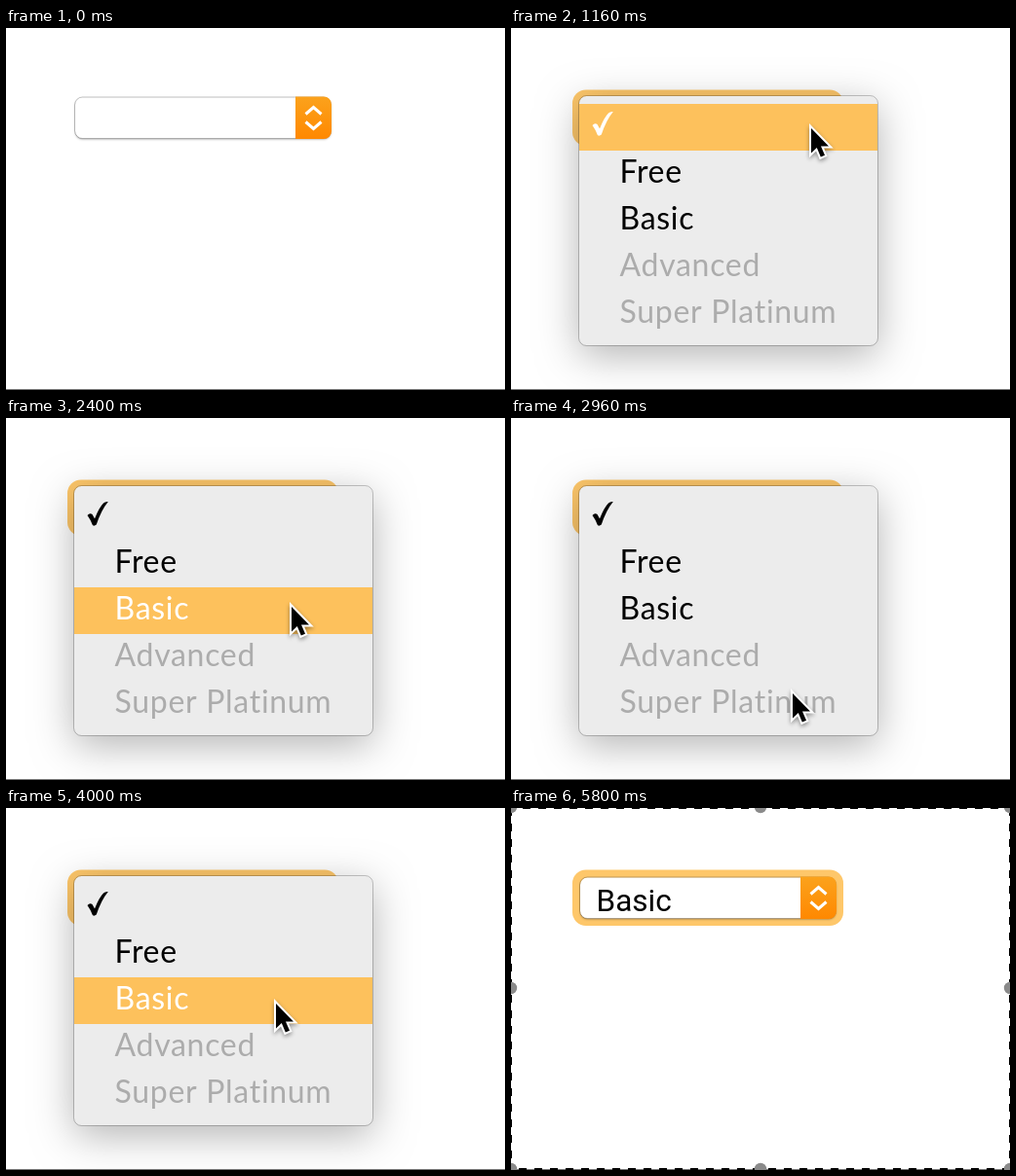
An HTML page with a canvas for the animation above (6600 ms loop, 512 by 372 pixels).

```html
<!DOCTYPE html>
<html lang="en">
<head>
<meta charset="utf-8">
<title>Select menu</title>
<style>
html, body { margin: 0; width: 100%; height: 100%; overflow: hidden; background: #fff; }
canvas { display: block; }
</style>
</head>
<body>
<canvas id="stage" width="512" height="372"></canvas>
<script>
const ctx = document.getElementById('stage').getContext('2d');
const W = 512, H = 372, LOOP = 6600, STEP = 40;
const OPEN = 520, BLINK = 3920, PICK = 4000, FADE = 4080, CLOSED = 4120;
const MARQUEE = 5320, LEAVE = 5800;
const ROW_TOP = 78, ROW_H = 48;
const LABELS = ['', 'Free', 'Basic', 'Advanced', 'Super Platinum'];

// The cursor rests between moves; each one eases out to its goal.
const MOVES = [
  { from: 0, to: 160, x: 315, y: 91 },
  { from: 480, to: 1160, x: 308, y: 103 },
  { from: 1480, to: 2080, x: 295, y: 167 },
  { from: 2160, to: 2400, x: 293, y: 194 },
  { from: 2560, to: 2960, x: 289, y: 283 },
  { from: 3240, to: 3680, x: 277, y: 201 },
  { from: 5680, to: 5800, x: 296, y: 350 }
];

const arrow = new Path2D('M0 0V25.5L5.8 20L9.8 29.5L14 27.7L10 18.4H18Z');
const check = new Path2D('M83.5 100Q86 97 88.5 99L91 103.5Q95.5 92 100 87.5Q102 85.5 104.8 86Q97.5 95 92.8 109.5Q90.5 111.5 88.8 110Q86.5 104 83.5 100');
const chevrons = new Path2D('M307.5 88.5L315.5 81.5L323.5 88.5M307.5 96.5L315.5 103.5L323.5 96.5');

const easeOut = p => 1 - (1 - p) * (1 - p);

function cursorAt(t) {
  if (t < STEP || t >= LEAVE) return null;
  let x = 580, y = 400;
  for (const m of MOVES) {
    if (t <= m.from) break;
    const p = easeOut(Math.min(1, (t - m.from) / (m.to - m.from)));
    x += (m.x - x) * p;
    y += (m.y - y) * p;
  }
  return { x, y };
}

function box(x, y, w, h, r, fill) {
  ctx.beginPath();
  ctx.roundRect(x, y, w, h, r);
  if (fill) {
    ctx.fillStyle = fill;
    ctx.fill();
  }
}

function outline(color, width, path) {
  ctx.strokeStyle = color;
  ctx.lineWidth = width;
  if (path) ctx.stroke(path);
  else ctx.stroke();
}

function shadow(color, blur, dy) {
  ctx.shadowColor = color;
  ctx.shadowBlur = blur;
  ctx.shadowOffsetY = dy;
}

function text(str, x, y, color, font, spacing) {
  ctx.font = font;
  ctx.letterSpacing = spacing;
  ctx.fillStyle = color;
  ctx.fillText(str, x, y);
}

function drawSelect(focused, value) {
  if (focused) box(63, 63.5, 278, 57.5, 14, '#fec76a');
  ctx.save();
  shadow('rgba(0,0,0,.35)', 2, 1);
  box(71, 71.5, 262.5, 42, 7.5, '#fff');
  ctx.restore();
  box(70.5, 71, 263, 42.5, 8);
  outline('rgba(0,0,0,.22)', 1);

  const glow = ctx.createLinearGradient(0, 71, 0, 114);
  glow.addColorStop(0, '#fba21c');
  glow.addColorStop(1, '#ff8800');
  box(297, 70.5, 37, 43.5, [0, 8, 8, 0], glow);
  outline('#fff', 3, chevrons);
  if (value) text(value, 87.5, 106, '#000', '31.5px Roboto, sans-serif', '0px');
}

function drawMenu(active, alpha) {
  ctx.save();
  ctx.globalAlpha = alpha;
  ctx.save();
  shadow('rgba(0,0,0,.3)', 42, 10);
  box(70, 70, 306, 256, 7.5, '#ececec');
  ctx.restore();
  box(69.5, 69.5, 307, 257, 8);
  outline('rgba(0,0,0,.22)', 1);

  if (active >= 0) {
    ctx.fillStyle = '#fdc15c';
    ctx.fillRect(70, ROW_TOP + active * ROW_H, 306, ROW_H);
  }
  ctx.fillStyle = active === 0 ? '#fff' : '#000';
  ctx.fill(check);
  LABELS.forEach((label, i) => {
    const color = i > 2 ? '#acacac' : i === active ? '#fff' : '#000';
    text(label, 111.5, 111 + i * ROW_H, color, '32px Lato, sans-serif', '0.7px');
  });
  ctx.restore();
}

function drawCursor({ x, y }) {
  ctx.save();
  ctx.translate(x, y);
  ctx.miterLimit = 4;
  shadow('rgba(0,0,0,.4)', 4, 2);
  outline('#fff', 4, arrow);
  ctx.shadowColor = 'transparent';
  ctx.fillStyle = '#000';
  ctx.fill(arrow);
  ctx.restore();
}

function dashes(x0, y0, x1, y1, phase) {
  ctx.beginPath();
  ctx.moveTo(x0, y0);
  ctx.lineTo(x1, y1);
  ctx.lineDashOffset = phase;
  outline('#000', 2);
}

function drawMarquee(alpha) {
  ctx.save();
  ctx.globalAlpha = alpha;
  ctx.setLineDash([8, 8]);
  dashes(0, 0, W, 0, 4);
  dashes(0, H - 1, W, H - 1, 8);
  for (const x of [0, W]) dashes(x, 0, x, H, 0);

  ctx.fillStyle = '#8a8a8a';
  for (let i = 0; i < 9; i++) {
    if (i === 4) continue;
    ctx.beginPath();
    ctx.arc(i % 3 * W / 2, Math.floor(i / 3) * H / 2 - 1, 6.2, 0, Math.PI * 2);
    ctx.fill();
  }
  ctx.restore();
}

function activeRow(t, cursor) {
  if (t >= BLINK && t < PICK) return -1;
  const row = Math.floor((cursor.y - 2 - ROW_TOP) / ROW_H);
  return row <= 2 ? row : -1;
}

function draw(t) {
  const cursor = cursorAt(t);
  ctx.fillStyle = '#fff';
  ctx.fillRect(0, 0, W, H);
  drawSelect(t >= OPEN, t >= CLOSED ? 'Basic' : '');
  if (t >= OPEN && t < CLOSED) drawMenu(activeRow(t, cursor), t >= FADE ? 0.5 : 1);
  ctx.fillStyle = '#777';
  ctx.fillRect(0, H - 1, W, 1);
  if (t >= MARQUEE) drawMarquee(t < MARQUEE + 80 ? 0.5 : 1);
  if (cursor) drawCursor(cursor);
}

const start = performance.now();
function tick() {
  const t = (performance.now() - start) % LOOP;
  draw(Math.floor(t / STEP) * STEP);
  requestAnimationFrame(tick);
}
tick();
</script>
</body>
</html>
```
